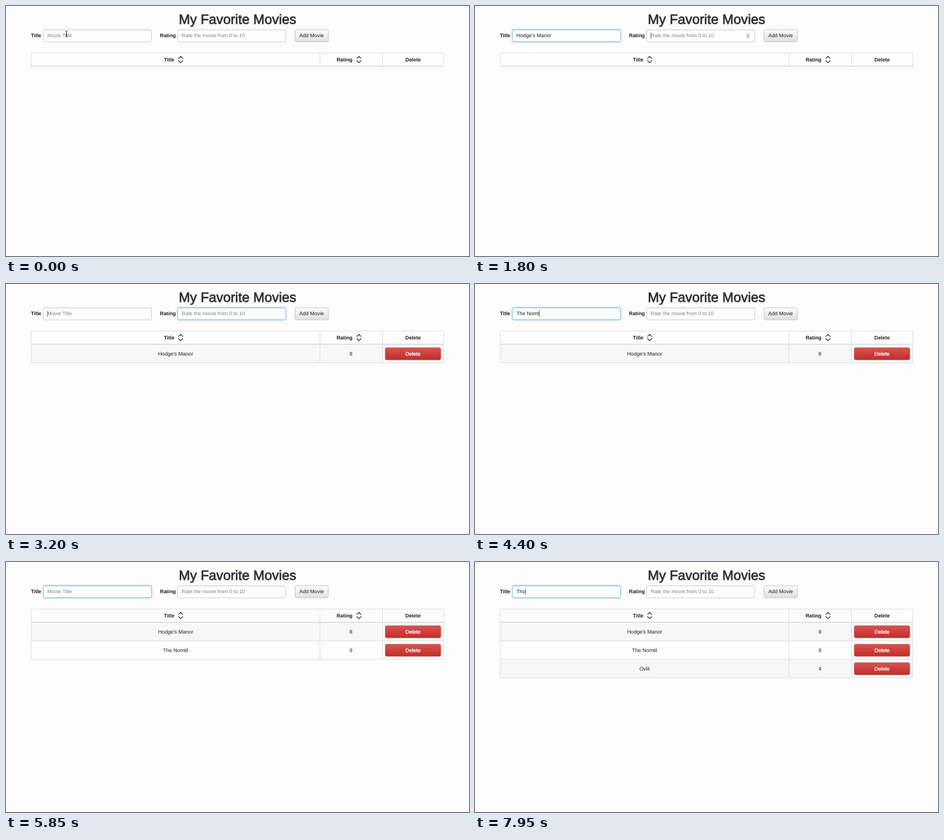
Recreate the animation shown at these times as an HTML page. Size 800x433 px, loop 8 s.

```html
<!DOCTYPE html>
<html lang="en">
<head>
<meta charset="utf-8">
<title>My Favorite Movies</title>
<style>
html, body { margin: 0; width: 100%; height: 100%; overflow: hidden; background: #fdfdfd; }
svg { display: block; width: 100vw; height: 100vh; }
text { font: 9px "Liberation Sans", Arial, sans-serif; fill: #1f1f1f; text-rendering: geometricPrecision; white-space: pre; }
.h1 { font-size: 23.4px; stroke: #2e3033; stroke-width: .75px; fill: #2e3033; }
.b { font-size: 8.85px; font-weight: 700; fill: #1c1c1c; }
.mid { text-anchor: middle; }
.hint { font-size: 8.85px; fill: #808080; }
.del { fill: #fff; stroke: #fff; stroke-width: .35px; }
.shade { fill: #000; opacity: .22; }
.line { fill: none; stroke: #ddd; }
.box { fill: #fefefe; stroke: #ccc; }
.ring { fill: none; stroke: #7dbdee; }
.glow { fill: #66afe9; fill-opacity: .55; filter: url(#blur); }
.sort { fill: none; stroke: #333; stroke-width: 1.2; stroke-linejoin: round; stroke-linecap: round; }
.caret { fill: #444; }
</style>
</head>
<body>
<svg id="stage" viewBox="0 0 800 433" preserveAspectRatio="none">
  <defs>
    <linearGradient id="light" x2="0" y2="1"><stop stop-color="#fdfdfd"/><stop offset="1" stop-color="#e0e0e0"/></linearGradient>
    <linearGradient id="red" x2="0" y2="1"><stop stop-color="#d9534f"/><stop offset="1" stop-color="#c12e2a"/></linearGradient>
    <filter id="blur" x="-10%" y="-60%" width="120%" height="220%"><feGaussianBlur stdDeviation="2.2"/></filter>
  </defs>
  <text class="h1 mid" x="400" y="30.9">My Favorite Movies</text>
  <text class="b" x="43" y="54">Title</text>
  <text class="b" x="266" y="54">Rating</text>
  <rect x="499.5" y="41" width="57.5" height="21" rx="2.5" fill="url(#light)" stroke="#c4c4c4"/>
  <text class="mid" x="528" y="54.3">Add Movie</text>
</svg>
<script>
const stage = document.getElementById('stage');
const LOOP = 8000, STEP = 50, FADE = 150;

function add(tag, attrs, parent = stage, label = '') {
  const el = document.createElementNS('http://www.w3.org/2000/svg', tag);
  for (const k in attrs) el.setAttribute(k, attrs[k]);
  el.textContent = label;
  parent.appendChild(el);
  return el;
}
const fade = (el, level) => el.setAttribute('opacity', +level);

// Form fields
function makeField(x, hint) {
  const box = { x: x + .5, y: 41, width: 187, height: 21, rx: 2.5 };
  const glow = add('rect', { ...box, class: 'glow' });
  add('rect', { ...box, class: 'box' });
  add('rect', { x: x + 2, y: 41.5, width: 184, height: 1, fill: '#000', opacity: .06 });
  const ring = add('rect', { ...box, class: 'ring' });
  return {
    x: x + 7.6, glow, ring,
    hint: add('text', { class: 'hint', x: x + 7.6, y: 54.3 }, stage, hint),
    value: add('text', { x: x + 7.6, y: 54.3 }),
    caret: add('rect', { class: 'caret', y: 46, width: .75, height: 11 })
  };
}
const fields = {
  title: makeField(64, 'Movie Title'),
  rating: makeField(296, 'Rate the movie from 0 to 10')
};
const spinner = add('g', {});
add('rect', { x: 468.8, y: 47, width: 6, height: 9.4, rx: 2, fill: '#f6f6f6', stroke: '#d4d4d4', 'stroke-width': .6 }, spinner);
add('path', { d: 'M470.2 50.7l1.6-2.3 1.6 2.3zM470.2 52.7l1.6 2.3 1.6-2.3z', fill: '#666' }, spinner);

// Table
const movies = [["Hodge's Manor", 8], ['The Nomtil', 9], ['Ovlit', 4]];
const rows = movies.map(([name, score], i) => {
  const g = add('g', {}), y = 104.5 + 32 * i;
  add('rect', { x: 43.5, y, width: 713, height: 32, fill: i % 2 ? '#fdfdfd' : '#f7f7f7' }, g);
  add('path', { class: 'line', d: `M43.5 ${y}v32h713v-32M542.5 ${y}v32M650.5 ${y}v32` + (i ? `M43.5 ${y}h713` : '') }, g);
  add('text', { class: 'mid', x: 293, y: y + 19.4 }, g, name);
  add('text', { class: 'mid', x: 596, y: y + 19.4 }, g, score);
  add('rect', { x: 655.4, y: y + 5.9, width: 95.7, height: 20.8, rx: 2.3, fill: 'url(#red)', stroke: '#b92c28', 'stroke-width': .65 }, g);
  add('text', { class: 'mid shade', x: 703.2, y: y + 18.8 }, g, 'Delete');
  add('text', { class: 'mid del', x: 703.2, y: y + 19.4 }, g, 'Delete');
  return g;
});
add('path', { class: 'line', d: 'M43.5 104.5V81.5h713v23M542.5 81.5v23M650.5 81.5v23' });
add('path', { class: 'line', d: 'M43 104.4h714', style: 'stroke:#d2d2d2;stroke-width:1.3' });
add('text', { class: 'b', x: 272.8, y: 95.8 }, stage, 'Title');
add('text', { class: 'b', x: 571.2, y: 95.8 }, stage, 'Rating');
add('text', { class: 'b mid', x: 703.3, y: 95.8 }, stage, 'Delete');
for (const x of [298, 606])
  add('path', { class: 'sort', d: `M${x} 90.9l3.8-3.7 3.8 3.7M${x} 94.5l3.8 3.7 3.8-3.7` });

const pointer = add('path', {
  d: 'M102.6 43.6q1.9 0 1.9 1.4 0-1.4 1.9-1.4M104.5 44.6v7.8M102.6 53.4q1.9 0 1.9-1.4 0 1.4 1.9 1.4M103.4 49.6h2.2',
  fill: 'none', stroke: '#222', 'stroke-width': .9
});

// Timeline: each event changes the state and shows the caret unless it blinks off
const events = [];
const at = (t, change) => events.push({ t, change });
const type = (field, text, times) =>
  times.forEach((t, i) => at(t, s => { s[field] = text.slice(0, i + 1); s.pointer = false; }));
const focus = (t, field) => at(t, s => { s.last = s.focus; s.focus = field; s.since = t; });
const enter = t => at(t, s => { s.title = s.rating = ''; s.count++; });
const blink = t => at(t, s => { s.caret = false; });

focus(200, 'title');
type('title', movies[0][0], [700, 800, 900, 950, 1050, 1150, 1200, 1250, 1400, 1450, 1550, 1600, 1700]);
focus(1800, 'rating');
blink(2400);
type('rating', '8', [2550]);
enter(2800);
blink(3050);
focus(3200, 'title');
type('title', movies[1][0], [3550, 3650, 3750, 3850, 3950, 4050, 4200, 4300, 4450, 4550]);
focus(4600, 'rating');
type('rating', '9', [4850]);
enter(5050);
blink(5350);
focus(5500, 'title');
blink(5800);
type('title', movies[2][0], [5950, 6050, 6150, 6200, 6300]);
focus(6400, 'rating');
type('rating', '4', [6700]);
enter(6950);
blink(7200);
focus(7250, 'title');
type('title', 'Tho', [7600, 7750, 7850]);

function stateAt(t) {
  const s = { title: '', rating: '', focus: '', last: '', since: 0, count: 0, caret: false, pointer: true };
  for (const e of events) {
    if (e.t > t) break;
    s.caret = true;
    e.change(s);
  }
  return s;
}

function draw(t) {
  const s = stateAt(t);
  const p = Math.min(1, (t - s.since) / FADE);
  const eased = p * p * (3 - 2 * p);
  for (const name in fields) {
    const f = fields[name], text = s[name];
    const level = name === s.focus ? eased : name === s.last ? 1 - eased : 0;
    fade(f.glow, level);
    fade(f.ring, level);
    f.value.textContent = text;
    fade(f.hint, !text);
    fade(f.caret, s.caret && name === s.focus);
    f.caret.setAttribute('x', f.x + (text ? f.value.getComputedTextLength() : 0));
  }
  fade(spinner, s.focus === 'rating');
  fade(pointer, s.pointer);
  rows.forEach((row, i) => fade(row, i < s.count));
}

let start;
function tick(now) {
  start ??= now;
  draw(Math.floor((now - start) % LOOP / STEP) * STEP);
  requestAnimationFrame(tick);
}
draw(0);
requestAnimationFrame(tick);
</script>
</body>
</html>
```
